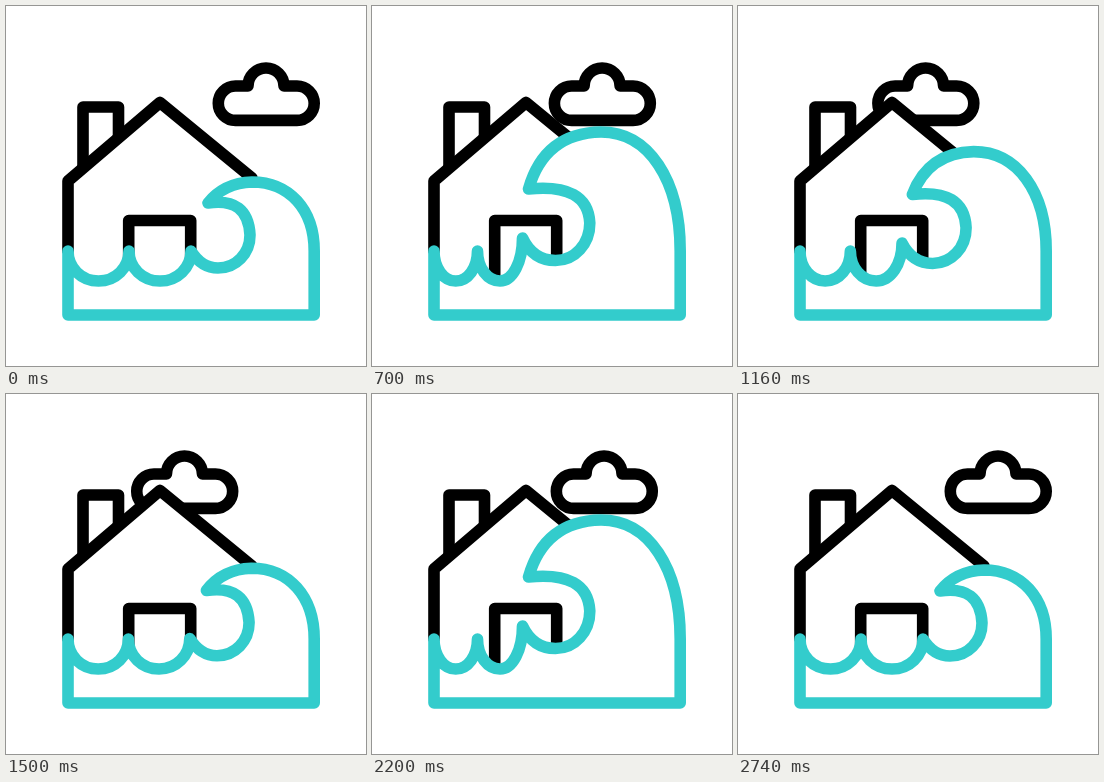
An HTML page with a canvas for the animation above (2.92 s loop, 360 by 360 pixels).

```html
<!DOCTYPE html>
<html lang="en">
<head>
<meta charset="utf-8">
<title>Flood</title>
<style>
html, body { margin: 0; width: 100%; height: 100%; overflow: hidden; background: #fff; }
canvas { display: block; width: 100vmin; height: 100vmin; }
</style>
</head>
<body>
<canvas id="stage" width="360" height="360"></canvas>
<script>
const ctx = document.getElementById('stage').getContext('2d');
const LOOP = 2920, STEP = 20, STROKE = 11.6;
const INK = '#000', WATER = '#33cccc', PAPER = '#fff';
const LEFT = 62, RIGHT = 308.2, FLOOR = 309, SEA = 245, TROUGH = 275;

const span = (t, a, b) => Math.min(1, Math.max(0, (t - a) / (b - a)));
const sine = u => (1 - Math.cos(Math.PI * u)) / 2;
const rise = (u, k) => 1 - (1 - u) ** k;
const fall = (u, k) => 1 - u ** k;

// 0 is calm, 1 is fully raised.
function waveHeight(t) {
  if (t < 720) return rise(span(t, 200, 720), 3);
  if (t < 1440) return fall(span(t, 720, 1375), 2.35);
  if (t < 2160) return rise(span(t, 1490, 2150), 2.35);
  return fall(span(t, 2180, 2720), 3);
}

function cloudShift(t) {
  return -82 * (sine(span(t, 180, 1440)) - sine(span(t, 1440, 2700)));
}

function paint(color) {
  ctx.strokeStyle = color;
  ctx.stroke();
}

function fillPaper() {
  ctx.fillStyle = PAPER;
  ctx.fill();
}

function line(...points) {
  ctx.beginPath();
  for (const [x, y] of points) ctx.lineTo(x, y);
}

// Quarter ellipse; leaves the first point upright or level.
function quarter([ax, ay], [bx, by], upright, k = 0.56) {
  const dx = (bx - ax) * k, dy = (by - ay) * k;
  if (upright) ctx.bezierCurveTo(ax, ay + dy, bx - dx, by, bx, by);
  else ctx.bezierCurveTo(ax + dx, ay, bx, by - dy, bx, by);
}

function scallop(a, b) {
  const low = [(a[0] + b[0]) / 2, TROUGH];
  quarter(a, low, true);
  quarter(low, b, false);
}

function drawCloud(dx) {
  const top = 80, r = 17.2, bump = 18;
  ctx.save();
  ctx.translate(dx, 0);
  ctx.beginPath();
  ctx.arc(229.5, top + r, r, Math.PI / 2, Math.PI * 1.5);
  ctx.arc(260, top, bump, Math.PI, 0);
  ctx.arc(291, top + r, r, -Math.PI / 2, Math.PI / 2);
  ctx.closePath();
  paint(INK);
  ctx.restore();
}

function drawHouse() {
  const eave = [LEFT, 175], ridge = [154, 96.5], slope = [246, 172];
  line(eave, ridge, slope, [246, 300], [LEFT, 300]);
  fillPaper();
  line([77, 160], [77, 101], [112.5, 101], [112.5, 130]);
  paint(INK);
  line([LEFT, SEA], eave, ridge, slope);
  paint(INK);
  line([122.7, 270], [122.7, 214.5], [184.7, 214.5], [184.7, 262]);
  paint(INK);
}

function drawWave(h) {
  const mix = (a, b) => a.map((v, i) => v + (b[i] - v) * h);
  const start = [LEFT, SEA], wall = [RIGHT, SEA];
  const mid = mix([123, SEA], [105.5, SEA]);
  const crest = mix([185, SEA], [150.5, 232]);
  const belly = mix([212, 262], [183.5, 254.5]);
  const curl = mix([244, 229], [217.8, 217]);
  const tip = mix([202, 197], [156.5, 183]);
  const top = mix([246, 176], [229, 126]);

  ctx.beginPath();
  ctx.moveTo(...start);
  scallop(start, mid);
  scallop(mid, crest);
  ctx.quadraticCurveTo(crest[0] + 10.5, belly[1], ...belly);
  quarter(belly, curl, false);
  ctx.quadraticCurveTo(curl[0] - 2, tip[1] - 6, ...tip);
  ctx.quadraticCurveTo(tip[0] + 16, top[1] + 1, ...top);
  quarter(top, wall, false, 0.6);
  ctx.lineTo(RIGHT, FLOOR);
  ctx.lineTo(LEFT, FLOOR);
  ctx.closePath();
  fillPaper();
  paint(WATER);
}

function draw(now) {
  const t = Math.floor((now % LOOP) / STEP) * STEP;
  ctx.fillStyle = PAPER;
  ctx.fillRect(0, 0, 360, 360);
  ctx.lineWidth = STROKE;
  ctx.lineCap = ctx.lineJoin = 'round';
  drawCloud(cloudShift(t));
  drawHouse();
  drawWave(waveHeight(t));
}

const begin = performance.now();
function tick() {
  draw(performance.now() - begin);
  requestAnimationFrame(tick);
}
tick();
</script>
</body>
</html>
```
